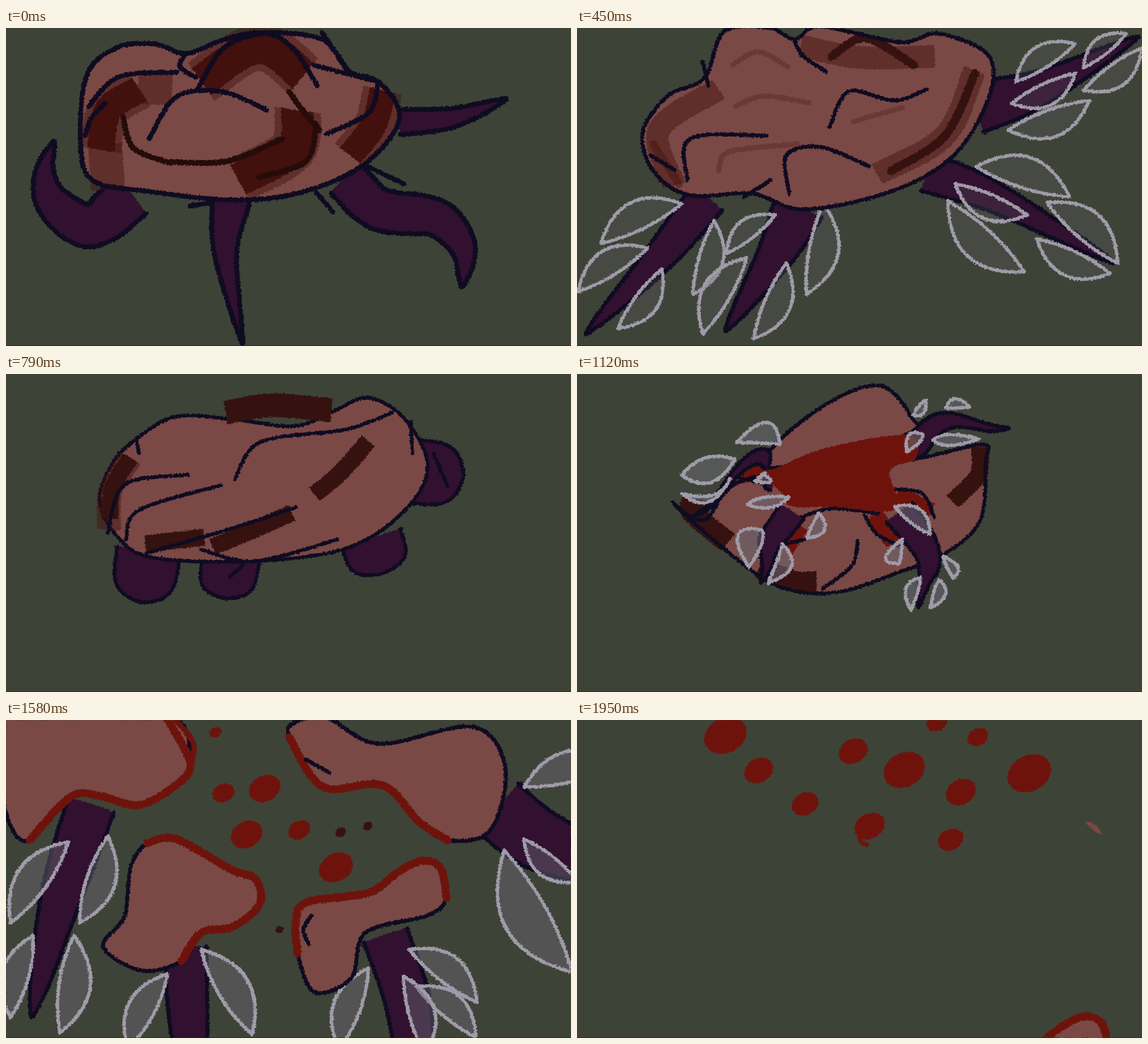
These frames come from a looping animation (998 by 561 pixels, 2 s). An HTML page with a canvas:

```html
<!DOCTYPE html>
<html lang="en">
<head>
<meta charset="utf-8">
<title>Creature</title>
<style>
html, body { margin: 0; width: 100%; height: 100%; overflow: hidden; }
body { background: linear-gradient(#2a2a20, #2a2a20) 0 560px / 998px 1px no-repeat #3e4337; }
canvas { display: block; filter: url(#rough); }
svg { position: absolute; }
</style>
</head>
<body>
<svg width="0" height="0"><filter id="rough" x="0" y="0" width="1" height="1" color-interpolation-filters="sRGB">
<feTurbulence type="fractalNoise" baseFrequency=".3" numOctaves="2" seed="4"/>
<feDisplacementMap in="SourceGraphic" scale="6" xChannelSelector="R" yChannelSelector="G"/>
</filter></svg>
<canvas width="998" height="561"></canvas>
<script>
const ctx = document.querySelector('canvas').getContext('2d');
const PINK = '#7a4945', MAROON = '#42100d', WASH = 'rgba(66,16,13,.45)', FAINT = 'rgba(66,16,13,.28)';
const UMBER = '#351210', SOOT = '#250c09', PURPLE = '#321030', INK = '#0f0b21', RED = '#6e130c', BONE = '#a09ba8';

const points = text => {
  const n = text.split(' ').map(Number);
  return n.filter((_, i) => i % 2 === 0).map((x, i) => [x, n[2 * i + 1]]);
};

// Smooth position along a few points, u from 0 to 1.
function along(p, u) {
  const s = u * (p.length - 1), i = Math.min(p.length - 2, Math.floor(s)), f = s - i;
  const at = j => p[Math.max(0, Math.min(p.length - 1, j))];
  return [0, 1].map(k => {
    const [a, b, c, d] = [-1, 0, 1, 2].map(o => at(i + o)[k]);
    return b + f / 2 * (c - a + f * (2 * a - 5 * b + 4 * c - d + f * (3 * (b - c) + d - a)));
  });
}

class Sketch {
  constructor(ink = 7) {
    this.ink = ink;
    this.items = [];
    this.roots = [];
    this.edge = [];
  }
  add(kind, pts, color, width) {
    this.items.push({ kind, pts, color, width });
    return this;
  }
  fill(color, path) { return this.add('fill', points(path), color); }
  line(color, width, ...paths) {
    for (const p of paths) this.add('line', points(p), color, width);
    return this;
  }
  lines(...paths) { return this.line(INK, this.ink, ...paths); }
  brush(color, width, ...paths) {
    for (const p of paths) {
      if (color === MAROON) this.add('brush', points(p), WASH, width + 24);
      this.add('brush', points(p), color, width);
    }
    return this;
  }
  body(path) {
    this.edge.push(points(path));
    return this.add('fill', points(path), PINK);
  }
  outline() {
    for (const e of this.edge) this.add('ring', e, INK, this.ink);
    return this;
  }
  // Tapers from half-width w to a tip; a high power keeps it thick for longer.
  limb(w, power, path) {
    const spine = points(path), left = [], right = [];
    for (let i = 0; i < 12; i++) {
      const u = i / 12, [x, y] = along(spine, u), [nx, ny] = along(spine, u + .02);
      const len = Math.hypot(nx - x, ny - y), r = w * (1 - u ** power) / len;
      left.push([x + (ny - y) * r, y - (nx - x) * r]);
      right.unshift([x - (ny - y) * r, y + (nx - x) * r]);
    }
    const tip = spine[spine.length - 1], rim = [...left, tip, ...right];
    this.roots.push(spine[0], tip);
    return this.add('fill', rim, PURPLE).add('line', rim, INK, this.ink);
  }
  // Leaf from base to tip, bowed to one side.
  claw(alpha, bow, ...paths) {
    this.clawed = true;
    for (const p of paths) {
      const [[x, y], [tx, ty]] = points(p);
      const side = k => [(x + tx) / 2 - (ty - y) * k, (y + ty) / 2 + (tx - x) * k];
      this.add('claw', [[x, y], side(bow - .16), [tx, ty], side(bow + .16)], `rgba(107,104,115,${alpha})`);
    }
    return this;
  }
  get anchors() {
    const far = f => this.edge.flat().reduce((a, b) => f(b) < f(a) ? b : a);
    return [far(p => p[0]), far(p => p[1]), far(p => -p[0]), ...this.roots];
  }
}

const walk = new Sketch(8.5)
  .limb(22, 2, '695 166 790 158 885 125').limb(37, 3, '600 265 660 320 760 335 808 390 805 457')
  .limb(33, 1.3, '397 305 388 400 418 557').limb(42, 1.8, '220 295 150 348 85 310 68 255 85 200')
  .body('132 210 142 85 195 35 262 28 318 45 380 22 450 8 558 20 605 76 658 95 695 150 670 205 605 258 500 295 390 303 250 288 155 270')
  .brush(WASH, 60, '265 75 262 135', '175 205 180 285')
  .brush(MAROON, 48, '168 215 180 145 236 108').brush(MAROON, 58, '345 95 420 42 470 40 525 85', '515 145 505 215 410 268')
  .brush(MAROON, 46, '665 110 650 170 608 225')
  .line(SOOT, 10, '207 157 225 212 290 238', '285 236 390 235 488 195', '500 112 520 140 553 180', '548 170 530 235 447 263')
  .outline()
  .lines('340 105 385 35 460 10 510 40 550 102', '146 138 200 86 302 78', '175 133 150 160 140 190',
    '253 195 300 122 380 112 460 144', '545 66 658 95', '658 95 640 150 566 187', '318 45 307 68 335 87',
    '558 8 605 76', '640 245 703 275', '325 314 365 308', '548 290 578 325');

const stride = new Sketch(10)
  .limb(38, 2.5, '712 155 840 110 962 32').limb(36, 3, '600 255 760 330 965 482')
  .limb(35, 1.8, '385 300 325 410 230 542').limb(30, 4, '225 292 120 355 -30 370')
  .body('122 165 155 105 235 85 380 62 400 18 450 8 535 40 680 22 733 70 700 180 590 250 490 302 300 315 190 275 140 235')
  .brush(MAROON, 35, '152 195 220 115 360 82').brush(MAROON, 38, '398 38 470 42 560 92')
  .brush(MAROON, 50, '385 262 490 225 580 150')
  .line(UMBER, 25, '558 65 610 110 612 190').line(UMBER, 13, '295 231 430 205 550 145')
  .outline()
  .lines('382 80 387 40 394 100', '625 38 660 55 678 84', '150 232 205 182 275 140',
    '390 172 460 116 525 115 558 152', '185 278 225 252 282 252', '500 25 570 82');

const bristle = new Sketch()
  .limb(45, 1.6, '705 140 820 105 992 15').limb(34, 2, '620 255 740 300 950 415')
  .limb(44, 1.8, '392 315 350 400 262 535').limb(34, 2, '230 300 140 410 15 540')
  .claw(.2, -.1, '775 95 880 28', '895 70 970 10', '705 245 870 298', '830 308 955 415', '370 415 312 548',
    '435 310 405 470', '150 425 72 530', '242 340 205 470')
  .claw(.2, .1, '895 110 998 35', '768 133 880 80', '762 180 905 128', '668 275 795 330', '655 305 790 430',
    '812 372 942 433', '350 330 264 398', '300 405 222 540', '185 310 42 380', '125 388 2 465')
  .body('116 185 160 120 225 88 260 6 340 0 385 20 430 -3 570 25 640 10 728 50 725 130 660 230 550 290 400 320 310 292 200 295 137 255')
  .brush(WASH, 40, '172 278 145 180 250 108', '395 32 500 52 632 50', '702 75 650 190 530 258')
  .line(WASH, 14, '135 205 180 275')
  .line(FAINT, 9, '275 65 320 42 372 68', '280 138 330 120 410 132', '250 252 270 218 390 205', '488 165 575 140')
  .line(UMBER, 15, '450 50 510 18 595 65', '703 80 650 190 555 252')
  .outline()
  .lines('385 25 400 50 440 77', '222 60 232 102', '195 268 200 195 335 190', '375 292 370 225 430 210 516 244',
    '446 175 480 112 560 128 618 108', '130 225 172 250', '295 298 342 268');

const crouch = new Sketch(6.5)
  .limb(56, 5, '725 172 765 176 808 180').limb(54, 6, '645 290 655 320 665 352')
  .limb(50, 6, '398 325 392 360 388 396').limb(56, 5, '252 312 245 360 238 403')
  .body('165 220 190 155 230 115 300 75 400 80 510 92 580 65 640 42 705 80 745 165 700 245 600 308 440 330 260 324 195 285')
  .outline()
  .brush(UMBER, 42, '388 68 470 55 575 64').brush(WASH, 42, '182 275 185 205 220 148')
  .brush(UMBER, 30, '183 255 188 200 220 148', '545 212 590 175 640 118', '246 300 350 288', '365 305 430 278 505 245')
  .lines('404 186 450 120 600 98 682 68', '180 280 210 195 322 178', '212 292 235 240 380 196',
    '248 316 400 272 513 235', '345 310 440 330 585 292', '230 115 235 140', '715 85 718 140',
    '755 140 780 198', '395 358 418 338');

const leap = new Sketch(6.5)
  .body('175 235 205 160 290 110 490 112 690 105 702 150 680 240 600 295 530 330 420 360 310 352 240 300')
  .body('365 45 400 8 450 3 512 35 485 68 400 72')
  .brush(UMBER, 30, '688 115 688 170 625 198').brush(UMBER, 38, '205 205 205 245 242 275', '270 318 340 338 385 333')
  .brush(RED, 32, '340 262 378 200', '470 205 505 258', '505 172 570 205', '268 94 350 92')
  .outline()
  .lines('452 250 445 300 395 348', '460 205 475 240 515 265', '495 160 550 170 578 215',
    '380 185 430 176 475 205', '270 100 320 122 375 100', '345 245 387 230')
  .limb(22, 2, '495 90 590 42 725 24').limb(28, 2, '510 205 575 300 552 462')
  .limb(24, 2, '365 175 315 250 272 345').limb(16, 2, '412 92 310 75 182 120')
  .fill(RED, '415 70 440 62 488 68 500 110 480 125 500 200 430 172 365 165 405 125 380 85')
  .claw(.55, .11, '372 50 195 24', '260 65 86 115', '362 148 232 216', '308 218 235 372', '518 35 580 -20',
    '552 76 740 44', '518 252 515 400', '558 385 526 510')
  .claw(.55, -.13, '250 90 103 185', '380 85 288 127', '340 245 268 402', '412 180 358 285', '482 98 575 40',
    '600 15 690 -10', '500 195 634 302', '602 298 630 420', '592 388 560 502');

// The torn edge is painted red over the start of the outline.
const chunk = (art, torn, rest) => art.body(torn + ' ' + rest).outline().line(RED, 14, torn);
const chunks = [
  { v: [-420, -250], art: chunk(new Sketch().limb(42, 2.5, '150 150 95 320 45 525')
    .claw(.45, .08, '110 215 8 358', '48 380 8 525').claw(.45, -.08, '180 205 130 358', '120 380 95 552'),
    '280 -10 325 75 300 115 235 150 170 135 115 135 42 212', '5 180 -10 95 -10 -10').line(RED, 10, '300 0 332 45 320 95') },
  { v: [520, -200], art: chunk(new Sketch().limb(55, 5, '870 155 940 210 1080 270')
    .claw(.45, -.1, '915 118 1080 80').claw(.45, .1, '915 210 1010 285', '880 230 1000 445'),
    '500 30 560 118 665 115 730 180 780 212', '855 195 882 85 825 12 660 42 570 -2 515 2').lines('530 70 572 93') },
  { v: [-480, 300], art: chunk(new Sketch().limb(36, 6, '318 400 320 490 330 640')
    .claw(.45, .08, '285 448 215 580').claw(.45, -.08, '345 405 435 555'),
    '250 217 300 210 400 265 440 280 448 325 400 365 345 375 310 425', '240 442 172 400 210 345 220 260') },
  { v: [160, 275], art: chunk(new Sketch().limb(40, 6, '670 380 710 500 725 640')
    .claw(.45, .08, '640 438 588 580').claw(.45, -.1, '725 470 830 560', '702 452 740 590', '712 405 832 498'),
    '515 412 512 360 530 322 640 305 690 270 735 248 768 262 778 314', '745 345 635 375 610 455 545 480')
    .lines('540 345 525 370 535 395') }
];

// x, y, radius
const spray = [[370, 22, 10], [384, 129, 18], [457, 121, 26], [425, 202, 26], [518, 194, 18], [583, 260, 28]];
const specks = [[591, 198, 9], [639, 187, 8], [483, 370, 7]];
const rain = [[262, 27, 35], [321, 89, 24], [488, 55, 24], [403, 148, 22], [517, 187, 25], [578, 88, 34],
  [636, 4, 17], [708, 30, 17], [678, 127, 25], [660, 211, 21], [799, 94, 36]];
const trail = new Sketch().line(RED, 7, '497 195 501 214 513 220').fill(PINK, '898 179 915 185 927 201 912 194');

function curve(p, closed) {
  const n = p.length, at = i => closed ? p[(i + n) % n] : p[Math.max(0, Math.min(n - 1, i))];
  ctx.beginPath();
  ctx.moveTo(...p[0]);
  for (let i = 0; i < n - (closed ? 0 : 1); i++) {
    const [a, b, c, d] = [at(i - 1), at(i), at(i + 1), at(i + 2)];
    ctx.bezierCurveTo(b[0] + (c[0] - a[0]) / 6, b[1] + (c[1] - a[1]) / 6,
      c[0] - (d[0] - b[0]) / 6, c[1] - (d[1] - b[1]) / 6, ...c);
  }
}

function leaf([base, side, tip, back]) {
  const ctrl = m => m.map((v, k) => 2 * v - (base[k] + tip[k]) / 2);
  ctx.beginPath();
  ctx.moveTo(...base);
  ctx.quadraticCurveTo(...ctrl(side), ...tip);
  ctx.quadraticCurveTo(...ctrl(back), ...base);
}

function draw(sketch, move = p => p, grow = 1) {
  for (const { kind, pts, color, width } of sketch.items) {
    const p = pts.map(move);
    ctx.fillStyle = ctx.strokeStyle = color;
    ctx.lineCap = kind === 'brush' ? 'butt' : 'round';
    ctx.lineWidth = width;
    if (kind === 'claw') {
      leaf(p.map(q => q.map((v, k) => p[0][k] + (v - p[0][k]) * grow)));
      ctx.fill();
      ctx.strokeStyle = BONE;
      ctx.lineWidth = 6;
      ctx.stroke();
    } else {
      curve(p, kind === 'fill' || kind === 'ring');
      if (kind === 'fill') ctx.fill();
      else ctx.stroke();
    }
  }
}

function drops(list, color, scale, size = 1) {
  ctx.fillStyle = color;
  for (const [x, y, r] of list) {
    ctx.beginPath();
    ctx.ellipse(480 + (x - 480) * scale, 170 + (y - 170) * scale, r * 1.12 * size, r * .88 * size, -.5, 0, 7);
    ctx.fill();
  }
}

// Pulls every point along with the nearest anchors.
const warp = (from, to, w) => ([x, y]) => {
  let sum = 0, dx = 0, dy = 0;
  from.forEach(([ax, ay], i) => {
    const k = 1 / (Math.hypot(x - ax, y - ay) ** 2.5 + 1);
    sum += k;
    dx += k * (to[i][0] - ax);
    dy += k * (to[i][1] - ay);
  });
  return [x + dx / sum * w, y + dy / sum * w];
};

const spans = [[0, 120, walk, stride], [120, 450, stride, bristle], [450, 790, bristle, crouch],
  [790, 870, crouch, crouch], [870, 1330, crouch, leap]];

function burst(t) {
  const k = (t - 1580) / 370;
  if (t < 1750) {
    drops(spray, RED, 1 + k);
    drops(specks, UMBER, 1 + k);
  } else {
    drops(rain, RED, .5 + k / 2, .6 + .4 * k);
    if (k >= 1) draw(trail);
  }
  for (const { v, art } of chunks) draw(art, ([x, y]) => [x + v[0] * k, y + v[1] * k]);
}

function paint(t) {
  ctx.clearRect(0, 0, 998, 561);
  ctx.lineJoin = 'round';
  const span = spans.find(s => t >= s[0] && t < s[1]);
  if (span) {
    const [t0, t1, a, b] = span, u = (t - t0) / (t1 - t0);
    const [near, far, w] = u < .5 ? [a, b, u] : [b, a, 1 - u];
    draw(near, warp(near.anchors, far.anchors, w), far.clawed ? 1 : 1 - w);
  } else if (t < 1450) {
    const swell = 1 + (t - 1330) / 350;
    draw(leap, ([x, y]) => [450 + (x - 450) * swell, 190 + (y - 190) * swell]);
  } else burst(t);
}

// 24 drawings a second, some held twice as long.
const held = new Set([5, 7, 9, 20, 22, 24, 26, 28, 30, 35]);
const startOf = i => Math.floor(i * 100 / 24) * 10;
const begin = performance.now();
let shown = -1;

function tick() {
  const t = (performance.now() - begin) % 2000;
  let i = Math.min(47, Math.ceil(t * .024) + 1);
  while (i > 0 && (startOf(i) > t || held.has(i))) i--;
  if (i !== shown) paint(startOf(shown = i));
  requestAnimationFrame(tick);
}
tick();
</script>
</body>
</html>
```
